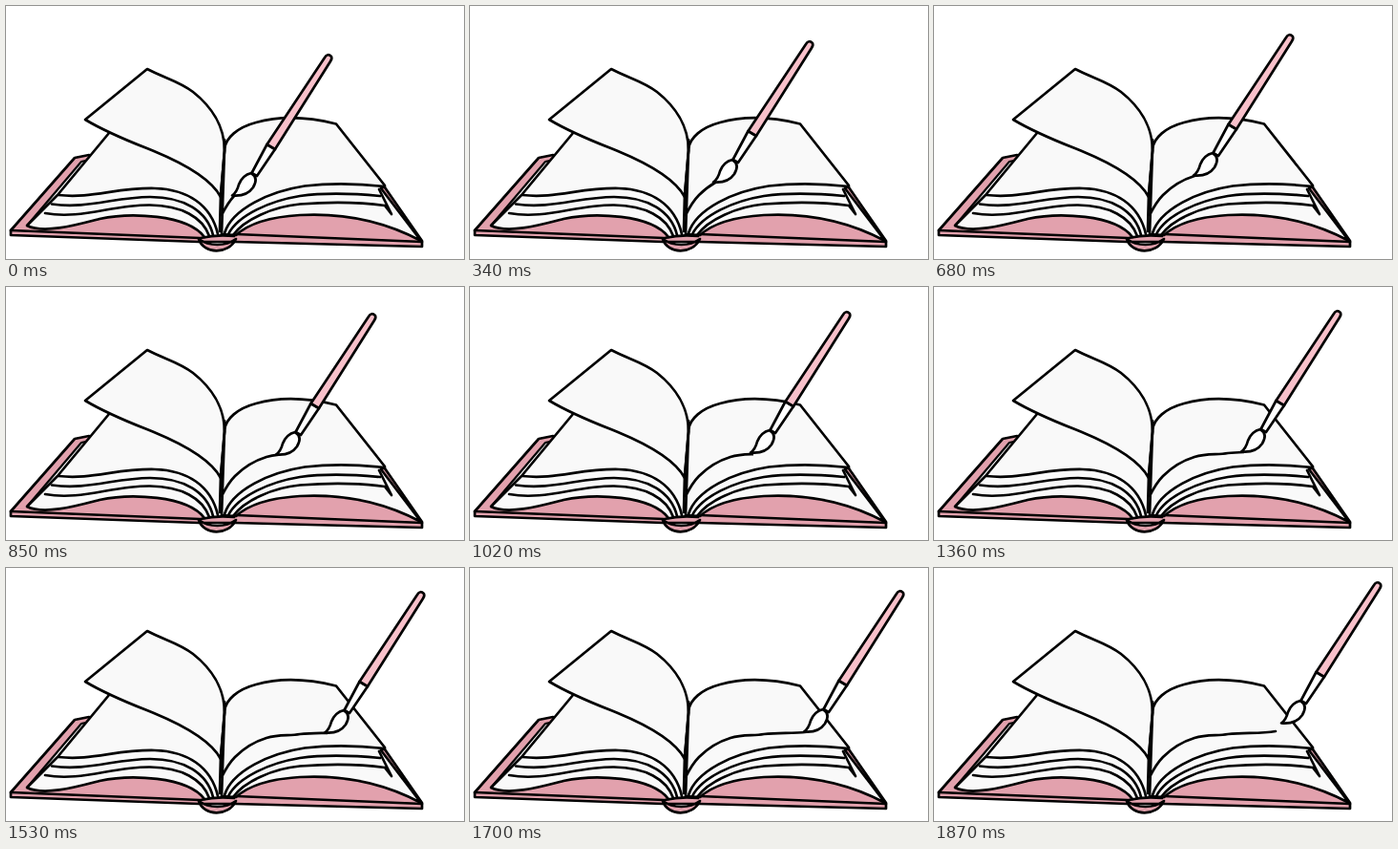
Recreate the animation shown at these times as an HTML page. Size 480 px wide and 265 px high, loop 2550 ms.

```html
<!DOCTYPE html>
<html lang="en">
<head>
<meta charset="utf-8">
<title>Book and brush</title>
<style>
html, body { margin: 0; width: 100%; height: 100%; overflow: hidden; background: #fff; }
svg { display: block; width: 480px; height: 265px; }
.ink { stroke: #000; stroke-width: 2.7; stroke-linecap: round; stroke-linejoin: round; fill: none; }
.cover { fill: #e2a1ad; }
.page { fill: #f9f9f9; }
.white { fill: #fff; }
.handle { fill: #f8c0ca; }
</style>
</head>
<body>
<svg viewBox="0 0 480 265">
  <clipPath id="clip"><rect id="reveal" y="0" height="265"/></clipPath>

  <g class="ink">
    <!-- cover -->
    <path class="cover" d="M5 235L72 159L87 156L110 180L226 239L330 190L397 190L436 246V252L240 247L202 247L5 240Z"/>
    <path d="M5 235L203 243M241 239L436 247"/>
    <path class="white" d="M88 161L79 163L22 230L60 225Z" stroke-width="2.2"/>

    <!-- left pages -->
    <path class="page" stroke="none" d="M108 133L54 198L22 230C40 239 75 229 98 223C130 216 190 218 208 242L226 239V190L160 140Z"/>
    <path d="M108 133L54 198L22 230C40 239 75 229 98 223C130 216 190 218 208 242"/>
    <path d="M41 217C78 224 112 208 151 208.5C184 209 206 221 213 241"/>
    <path d="M48 207.5C85 213 114 200 151 200C187 200 211 215 217 240"/>
    <path d="M55 198C90 202 116 190 156 191C190 192 215 208 222 239"/>

    <!-- right pages -->
    <path class="page" d="M229 150C230 138 243 127 262 122C290 114 320 117 346 123.5L397 188L393 191L435 246C390 222 345 217 308 219C275 221 253 229 241 240L226 239Z"/>
    <path d="M391 192L404 218L397 209C360 204 328 206 308 207.5C280 210 249 224 238 240"/>
    <path d="M392 199C360 196 330 196 308 199C277 204 243 219 233 239"/>
    <path d="M397 189C360 185 335 186 313 188.5C277 194 237 212 229 238"/>

    <!-- curling page -->
    <path class="page" d="M83 119L148 66C165 75 182 79 196 90C215 105 229 126 229 151L225 200C215 181 184 164 155 152C135 144 108 134 83 119Z"/>
    <path d="M229 140V152L225 198L224 236"/>

    <!-- spine -->
    <path class="cover" d="M202 244C207 260 233 261 241 244C230 252 213 252 202 244Z"/>
    <path d="M204 243Q221 239 239 241"/>

    <path clip-path="url(#clip)" d="M226 219C230 211 234 204 240 198C250 188 260 182 273 178C286 174 297 176 308 174C325 172 342 174 358 171"/>

    <g id="brush">
      <path class="white" d="M273.5 145L282 150L263 178L257.5 175Z"/>
      <path class="handle" d="M334 54Q337 49 341 53Q342 55 340 58L282 150L273.5 145Z"/>
      <path class="white" d="M237 198.5Q242 195 244 187Q248 177 257 175Q265 180 259 190Q252 200 237 198.5Z"/>
    </g>
  </g>
</svg>
<script>
const STEP = 170, LOOP = 2550;
// brush offset at each step
const path = [
  [0, 0], [9, -8], [18, -14], [27, -18], [35, -21], [46, -23],
  [57, -25], [68, -25], [85, -26], [97, -26], [113, -27], [127, -36]
];
const brush = document.getElementById('brush');
const reveal = document.getElementById('reveal');

function draw() {
  const i = Math.floor(performance.now() % LOOP / STEP);
  const [x, y] = path[Math.min(i, path.length - 1)];
  brush.setAttribute('transform', `translate(${x} ${y})`);
  reveal.setAttribute('width', 240 + x);
  requestAnimationFrame(draw);
}
draw();
</script>
</body>
</html>
```
